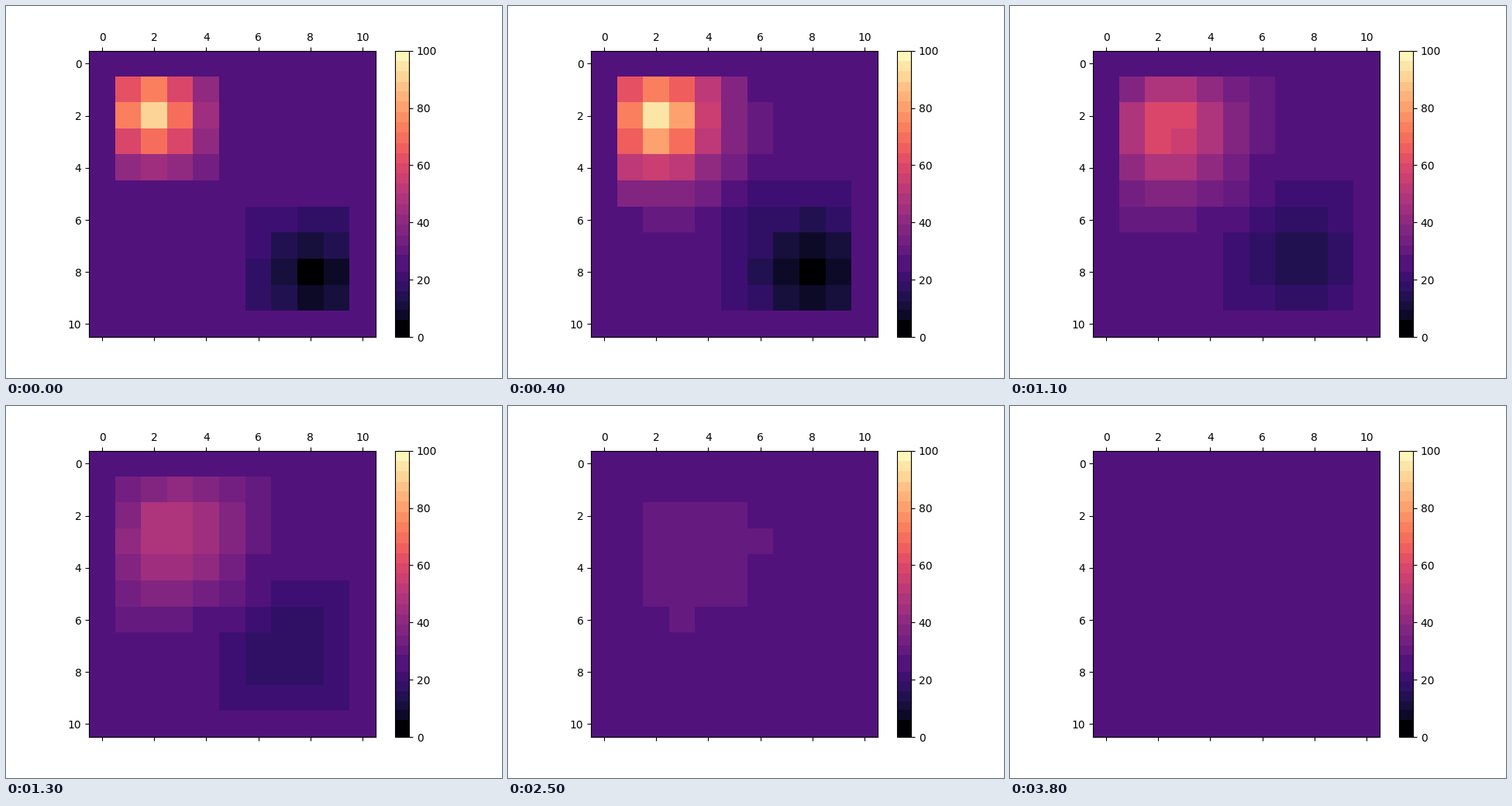
Write a matplotlib script that moves like this. It is 640 px wide and 480 px high and loops after 8 s.

```python
import numpy as np
import matplotlib.pyplot as plt
from matplotlib.animation import FuncAnimation
from matplotlib.colors import ListedColormap

SIZE, FRAMES, INTERVAL = 11, 80, 100
BASE = 25
SPOT = 2            # row and column of the hot cell
RISE, RELEASE = 4, 7

y, x = np.mgrid[:SIZE, :SIZE]
inside = (x % (SIZE - 1) > 0) & (y % (SIZE - 1) > 0)


def banded_magma(n=500):
    """Magma in flat bands, with one wide band around the base level."""
    edges = np.r_[0, np.linspace(6, 22.7, 6), np.linspace(28.5, 100, 21)]
    k = np.searchsorted(edges, (np.arange(n) + 0.5) * 100 / n) - 1
    mid = (edges[k] + edges[k + 1]) / 200
    mid[k == 0] = 0
    return ListedColormap(plt.get_cmap("magma")(mid))


def heated(n):
    """Excess heat while the source is on: a bump that grows and widens."""
    grow = (1 - 0.5 ** min(n, RISE)) / (1 - 0.5 ** RISE)
    amp, decay, mid = (a + (b - a) * grow
                       for a, b in ((70.3, 74), (0.36, 0.295), (1.92, 2.1)))
    bump = amp * np.exp(-decay * np.hypot(x - mid, y - mid) ** 1.5) - 3.3
    front = np.maximum(abs(x - SPOT), abs(y - SPOT)) <= 2 + n
    return np.maximum(bump, 0) * front * inside


def diffuse(u, weight):
    v = u.copy()
    mean = (u[:-2, 1:-1] + u[2:, 1:-1] + u[1:-1, :-2] + u[1:-1, 2:]) / 4
    v[1:-1, 1:-1] += weight * (mean - u[1:-1, 1:-1])
    return v


def simulate():
    states = []
    for n in range(FRAMES):
        if n <= RELEASE:
            u = heated(n)
        else:
            u = diffuse(u, min(1, (n - RELEASE) / 3))
        # the cold spot is the hot one turned half round, a third as strong
        states.append(BASE + u - u[::-1, ::-1] / 3)
    return states


states = simulate()
fig, ax = plt.subplots(figsize=(6.4, 4.8), dpi=100)
plate = ax.matshow(states[0], cmap=banded_magma(), vmin=0, vmax=100)
fig.colorbar(plate)


def update(n):
    plate.set_data(states[n])
    return [plate]


anim = FuncAnimation(fig, update, frames=FRAMES, interval=INTERVAL,
                     repeat=True, repeat_delay=0)
plt.show()
```
